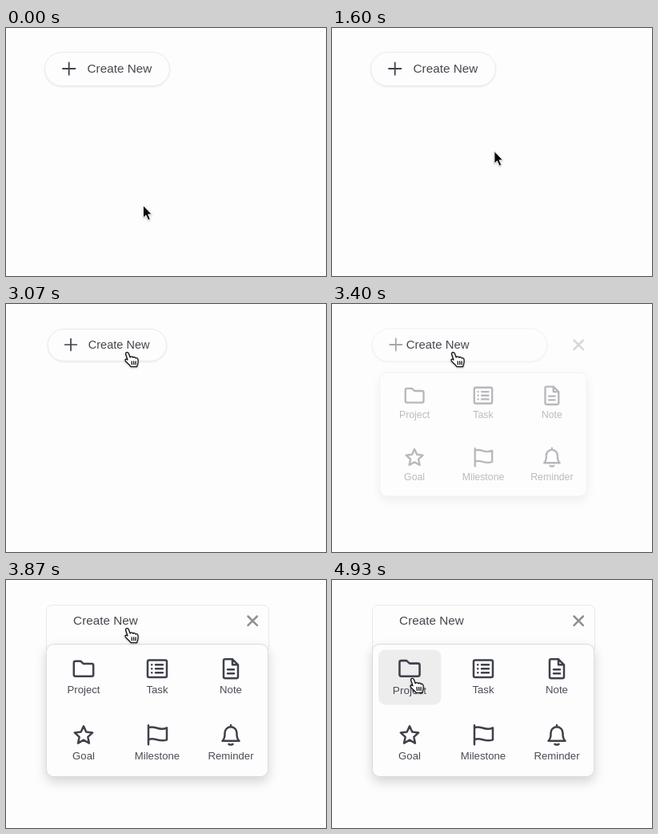
An HTML page that plays this animation: 400 px wide and 311 px high, repeating every 4.99 s.

```html
<!DOCTYPE html>
<html lang="en">
<head>
<meta charset="utf-8">
<title>Create menu</title>
<style>
  html, body { margin: 0; width: 100%; height: 100%; overflow: hidden; background: #fdfdfd; }
  svg { display: block; width: 100%; height: 100%; }
  text { font-family: "Liberation Sans", Arial, sans-serif; fill: #46474f; }
  .title { font-size: 15.3px; }
  .label { font-size: 13.2px; text-anchor: middle; fill: #4b4c55; }
  .line { fill: none; stroke: #3f414b; stroke-width: 2.5; stroke-linecap: round; stroke-linejoin: round; }
  .box { fill: #fdfdfd; stroke: #e9e9ec; stroke-width: 1; }
  #pill { filter: drop-shadow(0 1px 1px rgba(0, 0, 0, .08)); }
  #sheet { stroke: #dcdce1; filter: drop-shadow(0 6px 7px rgba(0, 0, 0, .16)); }
  #arrow, #hand { filter: drop-shadow(0 1px 1px rgba(0, 0, 0, .25)); }
</style>
</head>
<body>
<svg viewBox="0 0 400 311">
  <rect id="header" class="box" x="50.5" y="31.5" width="278" height="60" rx="7"/>
  <g id="button">
    <rect id="pill" class="box" x="48.5" y="30.5" height="42" rx="21"/>
    <path id="plus" class="line" style="stroke-width:1.8" d="M71 51h15.4M78.7 43.3v15.4"/>
    <text id="title" class="title" y="56.3">Create New</text>
  </g>
  <path id="close" class="line" style="stroke:#8b9297" d="M302.5 45.5l11.4 11.4m0-11.4l-11.4 11.4"/>
  <g id="panel">
    <rect id="sheet" class="box" x="50.5" y="80.5" width="277" height="166" rx="9"/>
    <rect id="tile" x="58" y="87.5" width="78.5" height="69" rx="9" fill="#ededed"/>
  </g>
  <path id="arrow" d="M0 0V15.5L3.5 12.3L6.2 18.4L8.8 17.2L6.2 11.3H10.8Z" fill="#0a0a0c" stroke="#fff" stroke-width=".9"/>
  <g id="hand" stroke="#121216" stroke-width="1.3" stroke-linecap="round" stroke-linejoin="round">
    <path fill="#fff" d="M-3.6 1.8C-3.9-.5-.8-1.1 0 .8L2 6C2.5 4.6 5 4.6 5.6 6.2C6.4 5 8.6 5.4 9 7C10 6 11.6 6.8 11.8 8.6C12.2 11 11.9 14 10.4 17.7H3C1.5 15.5-1 13.5-3 11.5C-5.6 8.8-3.4 7-1.2 9Z"/>
    <path fill="none" d="M3.9 10.8l.3 4M6.4 10.8l.2 4M8.9 10.8v4"/>
  </g>
</svg>
<script>
const LOOP = 4990, STEP = 1000 / 15;
const NS = "http://www.w3.org/2000/svg";
const el = id => document.getElementById(id);

const star = Array.from({ length: 10 }, (_, i) => {
  const r = i % 2 ? 5.6 : 11.8, a = i * Math.PI / 5;
  return [r * Math.sin(a), .8 - r * Math.cos(a)].map(v => v.toFixed(2));
}).join("L");

// Icon paths are centred on their own origin.
const items = [
  ["Project", "M-12.2-7.6q0-2 2-2h6.4l3.8 3.4H10.2q2 0 2 2V7.4q0 2-2 2H-10.2q-2 0-2-2Z"],
  ["Task", "M-10-10.7H10q2 0 2 2V8.7q0 2-2 2H-10q-2 0-2-2V-8.7q0-2 2-2ZM-6.8-5h.1M-6.8 0h.1M-6.8 5h.1M-2-5H7M-2 0H7M-2 5H7"],
  ["Note", "M-7-12H2L9-5V10q0 2-2 2H-7q-2 0-2-2V-10q0-2 2-2ZM2-12V-5H9M-4 1H4M-4 6H4"],
  ["Goal", "M" + star + "Z"],
  ["Milestone", "M-11-12V12M-11-9C-3-13 2-4 12-9V6C2 10-3 2-11 6"],
  ["Reminder", "M-10.5 7.5C-7 4-7.5 0-7.5-2.5C-7.5-7-4-10 0-10S7.5-7 7.5-2.5C7.5 0 7 4 10.5 7.5ZM0-12.3V-10M-2.5 11.6Q0 13 2.5 11.6"]
];

function add(parent, tag, attrs, content = "") {
  const node = document.createElementNS(NS, tag);
  for (const key in attrs) node.setAttribute(key, attrs[key]);
  node.textContent = content;
  return parent.appendChild(node);
}

const cells = items.map(([name, d], i) => {
  const x = 97 + i % 3 * 92, y = i < 3 ? 111.3 : 194.3;
  const cell = add(el("panel"), "g", {});
  add(cell, "path", { class: "line", d, transform: `translate(${x} ${y})` });
  add(cell, "text", { class: "label", x, y: y + 30.7 }, name);
  return cell;
});

const mix = (a, b, p) => a + (b - a) * p;
const ramp = (t, from, to) => Math.min(1, Math.max(0, (t - from) / (to - from)));
const smooth = p => p * p * (3 - 2 * p);
const easeOut = p => 1 - (1 - p) ** 3;
const fade = (id, value) => el(id).setAttribute("opacity", value);
const move = (node, value) => node.setAttribute("transform", value);
const zoom = (node, s, x, y) => move(node, `translate(${x} ${y}) scale(${s}) translate(${-x} ${-y})`);

// Pointer legs: start, end, then the three points of a quadratic curve.
const legs = [
  [0, 620, [171.5, 222.5], [254, 214], [236, 197.5]],
  [1267, 2007, [236, 197.5], [199, 160], [153.2, 61]],
  [4200, 4740, [153.2, 61], [134, 92], [102.2, 123.7]]
];

function pointerAt(t) {
  const [from, to, a, b, c] = legs.filter(leg => t >= leg[0]).pop();
  const p = smooth(ramp(t, from, to));
  return [0, 1].map(k => mix(mix(a[k], b[k], p), mix(b[k], c[k], p), p));
}

function render(t) {
  const slide = easeOut(ramp(t, 3330, 3630));
  const press = ramp(t, 2930, 3070) * (1 - slide);
  zoom(el("button"), mix(1, .95, press), 126.5, 51);
  el("pill").setAttribute("width", mix(156, 279, slide));
  el("title").setAttribute("x", mix(101.5, 84.1, slide));
  fade("pill", 1 - ramp(t, 3330, 3500));
  fade("plus", 1 - ramp(t, 3330, 3460));
  fade("close", ramp(t, 3330, 3530));
  fade("header", ramp(t, 3530, 3800));

  zoom(el("panel"), mix(.9, 1, easeOut(ramp(t, 3330, 3880))), 189, 163.5);
  fade("panel", ramp(t, 3310, 3560));

  const hover = smooth(ramp(t, 4540, 4760));
  fade("tile", hover);
  zoom(cells[0], mix(1, 1.03, hover), 97, 121.5);

  const overControl = t >= 1900 && t < 4260 || t >= 4590;
  const place = `translate(${pointerAt(t)})`;
  move(el("arrow"), place);
  move(el("hand"), place);
  fade("arrow", overControl ? 0 : 1);
  fade("hand", overControl ? 1 : 0);
}

const start = performance.now();
function tick() {
  const t = (performance.now() - start) % LOOP;
  render(Math.floor((t + 4) / STEP) * STEP);
  requestAnimationFrame(tick);
}
tick();
</script>
</body>
</html>
```
